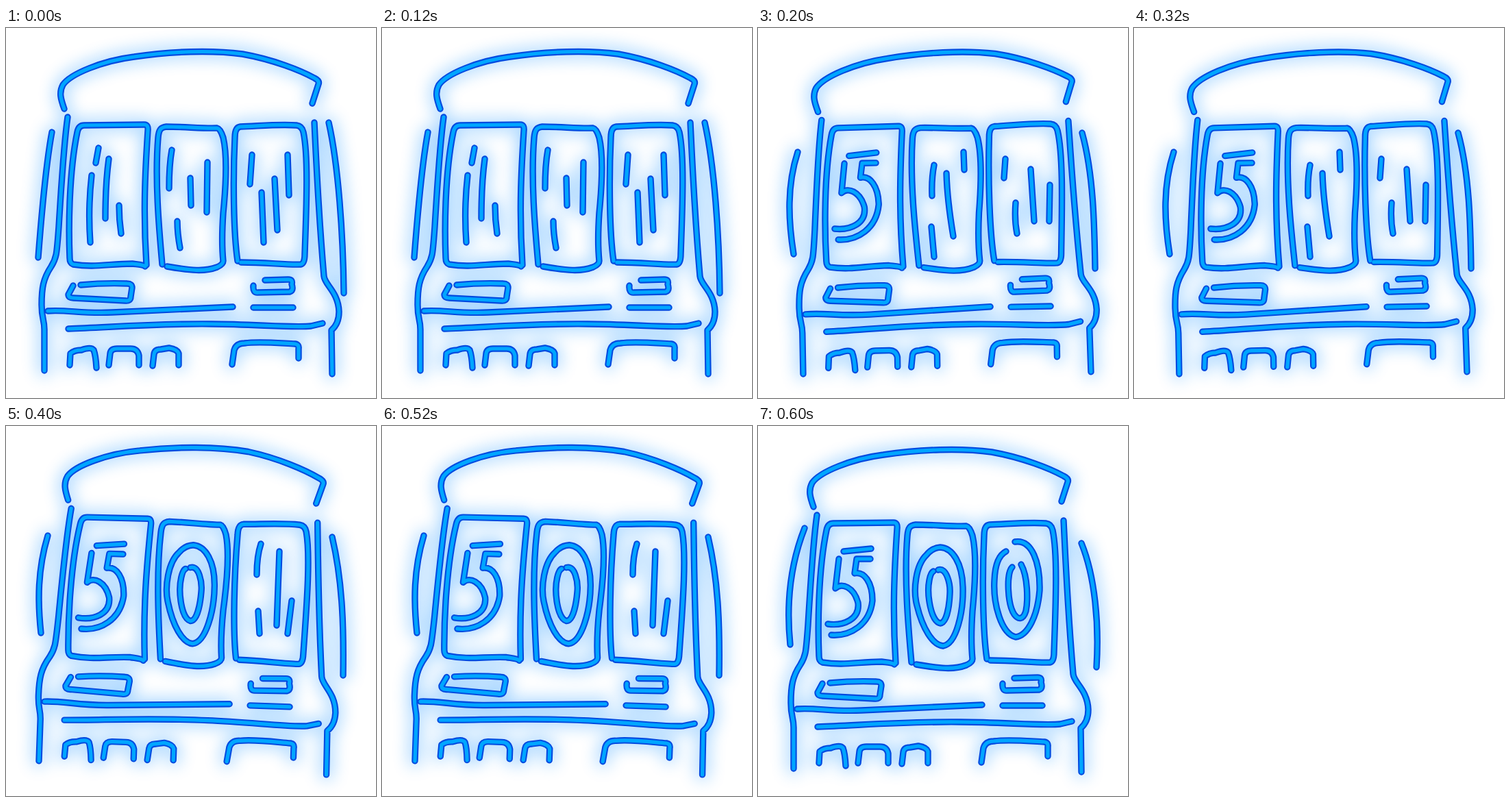
An HTML page for the animation above (800 ms loop, 540 by 540 pixels).

```html
<!DOCTYPE html>
<html lang="en">
<head>
<meta charset="utf-8">
<title>Neon tram</title>
<style>
  html, body { margin: 0; width: 100%; height: 100%; overflow: hidden; background: #fff; }
  svg { display: block; width: 100%; height: 100%; }
  .pose { visibility: hidden; fill: none; stroke-linecap: round; stroke-linejoin: round; }
  .glow { stroke: #0a8cff; stroke-width: 16; opacity: .4; filter: url(#soft); }
  .edge { stroke: #004ae0; stroke-width: 9.4; }
  .core { stroke: #00a6ff; stroke-width: 5.2; }
</style>
</head>
<body>
<svg id="stage" viewBox="0 0 540 540">
  <defs>
    <filter id="soft" filterUnits="userSpaceOnUse" x="0" y="0" width="540" height="540" color-interpolation-filters="sRGB">
      <feGaussianBlur stdDeviation="12.5"/>
    </filter>
  </defs>
</svg>
<script>
const STEP = 200;
const NS = 'http://www.w3.org/2000/svg';
const stage = document.getElementById('stage');
const defs = stage.querySelector('defs');

const shell = [
  'M85 118C80 104 77 94 83 83C94 67 140 48 187 42C240 34 300 32 345 38C390 46 430 62 450 73Q458 77 456 82L447 110',
  'M90 130C85 165 80 240 77 290C74 330 74 335 66 348C54 366 52 380 52 404C52 425 56 425 56 440V500',
  'M450 138C453 200 456 270 464 362C465 375 485 385 486 414C486 426 482 435 475 441L476 505'
].join('');

const panes = [
  'M203 348C200 345 190 345 184 344C150 344 130 350 98 345Q93 343 93 336C91 290 92 210 104 152Q106 142 114 142L202 141Q208 141 207 150C203 210 200 270 205 346',
  'M228 345C223 290 217 220 222 160C223 148 226 145 234 144C260 144 290 147 308 146Q313 147 317 160C324 190 320 240 317 270C315 300 315 320 317 340Q317 345 308 349C290 356 270 354 235 348',
  'M338 340C332 300 331 220 334 160Q334 145 342 144C370 143 400 140 424 142Q432 143 434 152C442 190 438 270 436 330Q436 344 430 345C410 346 380 342 343 342'
].join('');

const bumper = [
  'M98 376L91 389Q91 394 98 394L174 398Q182 399 182 392L184 379Q184 373 177 373C150 372 130 373 109 375',
  'M361 376Q360 387 368 386L414 385Q420 383 417 374Q419 367 412 367L378 368',
  'M61 413C90 411 110 417 155 415C220 412 280 409 331 407M361 408H419',
  'M91 439C150 437 220 431 300 432C360 432 420 438 445 435L462 431',
  'M93 492L94 475Q100 470 110 470Q124 465 128 470Q131 478 132 496',
  'M150 492L152 475Q153 468 162 468H182Q192 468 194 478V492',
  'M214 493L216 476Q217 469 226 469L238 467Q250 469 252 475V492',
  'M330 491L333 470Q336 460 348 460C370 457 400 460 422 461Q428 462 427 468V482'
].join('');

const digits = [
  'M129 183L169 179M122 194L117 237C126 228 144 235 150 258C153 282 129 292 106 289M168 194H148L145 215C159 212 171 228 171 255C167 290 139 307 111 305',
  'M250 188C234 203 230 240 236 262C244 295 259 320 274 321C294 318 304 270 303 235C302 200 288 178 270 177Q258 178 250 188M267 210C279 206 285 230 284 245C283 265 279 287 270 288C256 285 250 245 254 225Q256 214 260 212',
  'M379 169C404 165 416 200 415 240C412 277 398 306 380 308C359 303 347 260 349 225C350 200 356 188 366 183M388 202C398 220 398 255 395 270C391 283 384 283 378 275C368 260 366 215 375 206'
];

// Each pose: body shift and tilt, digits shown, side rails, loose streaks.
const poses = [
  { x: 0, y: 0, tilt: 0, shown: 0,
    rails: 'M67 152C58 200 52 270 47 335M471 138C485 200 492 300 493 387',
    streaks: 'M135 175L131 197M150 191C146 220 145 250 145 278M125 215C121 250 121 285 123 313M165 259Q165 280 168 300'
      + 'M242 178Q238 200 238 234M269 219L270 259M294 196L293 269M250 282Q250 300 254 321'
      + 'M359 185L356 228M411 185L413 244M392 220L396 295M373 240L376 313' },
  { x: 5, y: 1, tilt: -1.1, shown: 1,
    rails: 'M58 181C42 230 44 280 52 330M473 153C490 215 491 290 492 351',
    streaks: 'M257 200Q253 220 254 245M275 212C276 250 281 280 285 304M300 181L301 207M253 290L257 334'
      + 'M361 191L359 219M398 206L403 282M426 229L425 282M376 255Q374 280 378 300' },
  { x: 1, y: -3.5, tilt: 2.05, shown: 2,
    rails: 'M61 160C46 210 46 255 51 302M476 162C492 230 493 300 492 364',
    streaks: 'M372 172Q366 190 366 217M399 183L395 291M417 255L411 303M368 270L370 303' },
  { x: -4, y: 0, tilt: 0, shown: 3,
    rails: 'M68 149C46 205 41 260 47 319M472 171C492 220 498 290 494 352',
    streaks: '' }
];

function add(parent, tag, attrs) {
  const el = document.createElementNS(NS, tag);
  for (const key in attrs) el.setAttribute(key, attrs[key]);
  return parent.appendChild(el);
}

const groups = poses.map((p, i) => {
  const id = 'lines' + i;
  const lines = add(defs, 'g', { id });
  add(lines, 'path', {
    d: shell + panes + bumper + digits.slice(0, p.shown).join(''),
    transform: `translate(${p.x} ${p.y}) rotate(${p.tilt} 265 245)`
  });
  add(lines, 'path', { d: p.rails + p.streaks });

  const group = add(stage, 'g', { class: 'pose' });
  for (const layer of ['glow', 'edge', 'core']) add(group, 'use', { href: '#' + id, class: layer });
  return group;
});

function draw(now) {
  const current = Math.floor(now / STEP) % poses.length;
  groups.forEach((g, i) => { g.style.visibility = i === current ? 'visible' : 'hidden'; });
}

const start = performance.now();
function tick() {
  draw(performance.now() - start);
  requestAnimationFrame(tick);
}
draw(0);
requestAnimationFrame(tick);
</script>
</body>
</html>
```
